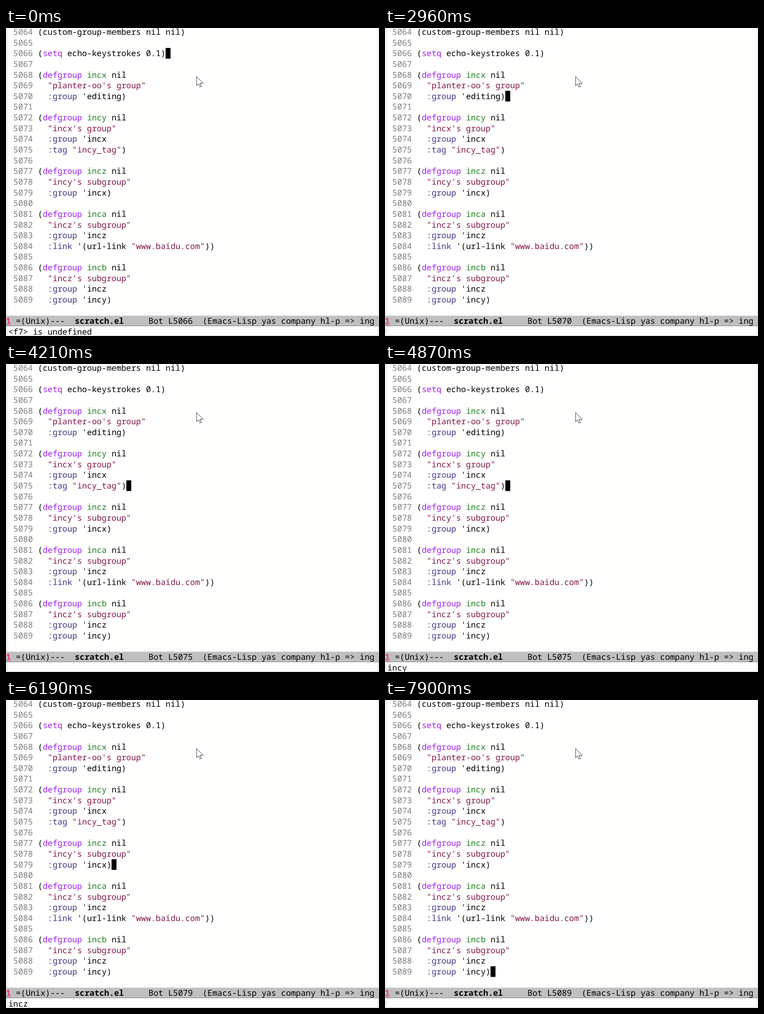
An HTML page that plays this animation: 824x680 px, repeating every 8 s.

```html
<!DOCTYPE html>
<html lang="en">
<head>
<meta charset="utf-8">
<style>
  html, body { margin: 0; width: 100%; height: 100%; overflow: hidden; background: #fffffd; }
  svg { display: block; }
  text {
    font: 18.095px "Noto Sans Mono", "DejaVu Sans Mono", monospace;
    font-variant-ligatures: none;
    white-space: pre;
    text-rendering: geometricPrecision;
  }
  .number { fill: #7f7f7f; }
  .keyword { fill: #a020f0; }
  .name { fill: #1e801e; }
  .string { fill: #831a4c; }
  .option { fill: #433887; }
  .bold { font-weight: 700; }
  .window { fill: #f0308c; font-weight: 700; }
</style>
</head>
<body>
<svg width="824" height="680" viewBox="0 0 824 680">
  <rect width="824" height="680" fill="#fffffd"/>
  <path d="M0 0H5.2V680H0ZM819.5 0H824V680H819.5Z" fill="#f2f2f2"/>
  <g id="buffer"></g>
  <rect id="cursor" width="10.86" height="23.6"/>
  <rect y="634.8" width="824" height="23.6" fill="#bfbfbf"/>
  <rect y="635" width="824" height="1" fill="#d6d6d6"/>
  <rect y="657" width="824" height="1" fill="#8a8a8a"/>
  <g id="modeline"></g>
  <rect y="655" width="10.86" height="1" fill="#f0308c"/>
  <g id="echo"></g>
  <rect y="679" width="824" height="1" fill="#c8c8c8"/>
  <path d="M421 107.2V127.6L425.6 123.4L428.6 130.4L431.6 129.1L428.7 122.2H435.6Z" fill="#fff" stroke="#222"/>
</svg>
<script>
const CELL = 10.857, LINE = 23.64, TOP = -3.2, LEFT = 5.2, BASELINE = 18.2;
const CODE_X = LEFT + 6 * CELL, FIRST_LINE = 5064, LOOP = 8000;

const code = `(custom-group-members nil nil)

(setq echo-keystrokes 0.1)

(defgroup incx nil
  "planter-oo's group"
  :group 'editing)

(defgroup incy nil
  "incx's group"
  :group 'incx
  :tag "incy_tag")

(defgroup incz nil
  "incy's subgroup"
  :group 'incx)

(defgroup inca nil
  "incz's subgroup"
  :group 'incz
  :link '(url-link "www.baidu.com"))

(defgroup incb nil
  "incz's subgroup"
  :group 'incz
  :group 'incy)`.split("\n");

// [start time, line holding the cursor, echo area message]
const timeline = [
  [0, 5066, "<f7> is undefined"],
  [780, 5066, ""],
  [1310, 5066, "0.1"],
  [2960, 5070, ""],
  [3550, 5070, "C-x-"],
  [3680, 5070, "incx"],
  [4210, 5075, ""],
  [4670, 5075, "C-x-"],
  [4870, 5075, "incy"],
  [5660, 5079, ""],
  [6060, 5079, "C-x-"],
  [6190, 5079, "incz"],
  [6780, 5084, ""],
  [7240, 5084, "C-x-"],
  [7440, 5084, "inca"],
  [7900, 5089, ""],
];

const byId = id => document.getElementById(id);
const rowTop = row => TOP + row * LINE;

function addText(parent, x, row, content, className = "") {
  const text = document.createElementNS("http://www.w3.org/2000/svg", "text");
  text.setAttribute("x", x);
  text.setAttribute("y", rowTop(row) + BASELINE);
  text.setAttribute("class", className);
  text.textContent = content;
  byId(parent).append(text);
  return text;
}

// Each syntax token is placed on its own column of the character grid.
const syntax = /(?<string>"[^"]*")|(?<option>:\w+)|(?<keyword>defgroup|setq)|(?<name>inc\w(?= nil))|[^":\s]+?(?=defgroup|setq|["\s]|$)/g;

code.forEach((line, row) => {
  addText("buffer", LEFT + CELL, row, FIRST_LINE + row, "number");
  for (const match of line.matchAll(syntax)) {
    const kind = Object.keys(match.groups).find(key => match.groups[key]);
    addText("buffer", CODE_X + match.index * CELL, row, match[0], kind);
  }
});

const modeText = (column, content, className) =>
  addText("modeline", column * CELL, 27, content, className);
modeText(0, "1", "window");
modeText(2, "=(Unix)---");
modeText(14, "scratch.el", "bold");
modeText(29, "Bot");
const position = modeText(33, "");
modeText(40, "(Emacs-Lisp yas company hl-p => ing");
const message = addText("echo", LEFT, 28, "");

let shown;
function draw(now) {
  const time = now % LOOP;
  const state = timeline.findLast(([start]) => start <= time);
  if (state !== shown) {
    const [, lineNumber, echo] = shown = state;
    const row = lineNumber - FIRST_LINE;
    byId("cursor").setAttribute("x", CODE_X + code[row].length * CELL);
    byId("cursor").setAttribute("y", rowTop(row));
    position.textContent = "L" + lineNumber;
    message.textContent = echo;
  }
  requestAnimationFrame(draw);
}
draw(0);
</script>
</body>
</html>
```
